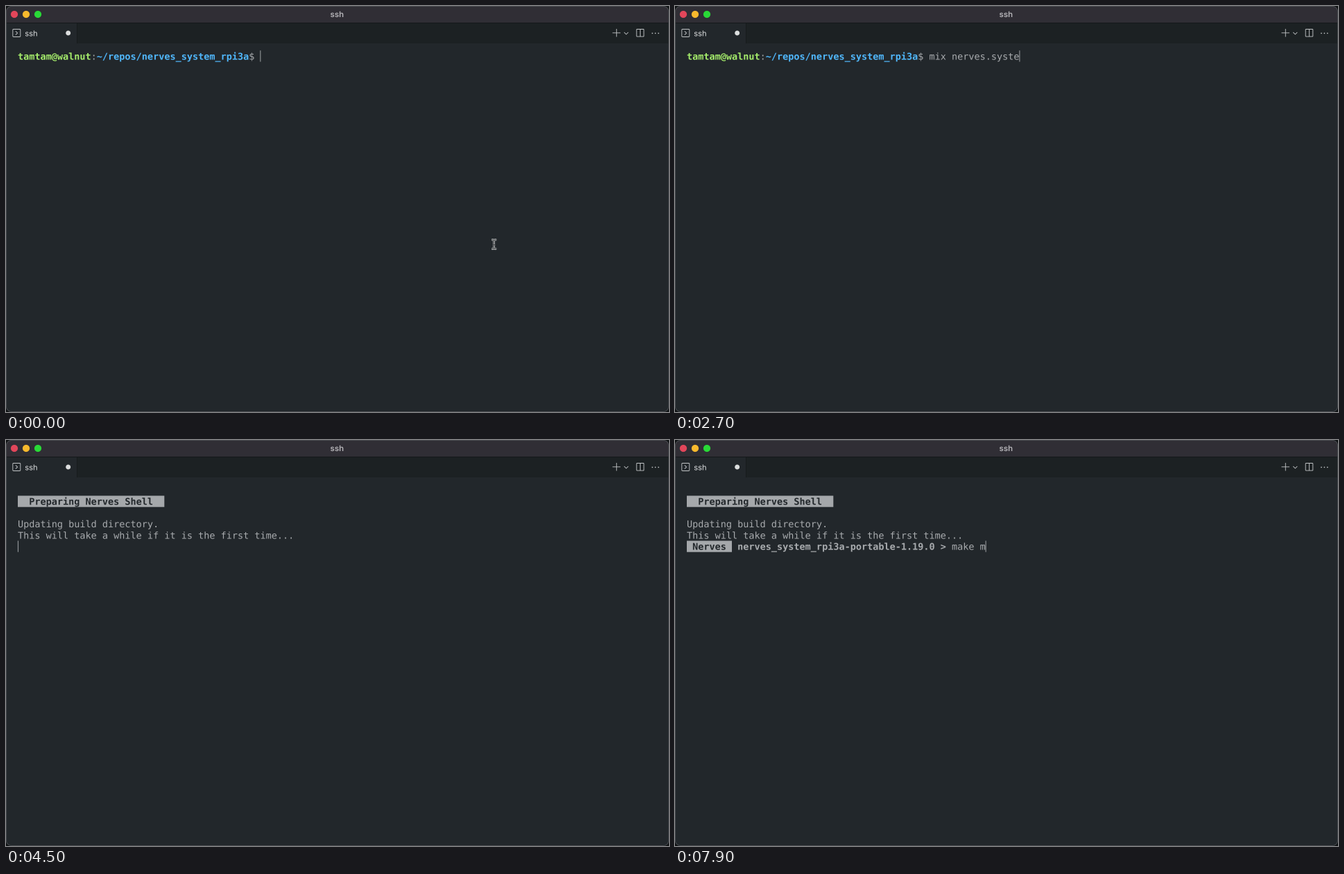
Recreate the animation shown at these times as an HTML page with a canvas. Size 956x586 px, loop 8000 ms.

```html
<!DOCTYPE html>
<html lang="en">
<head>
<meta charset="utf-8">
<title>Terminal</title>
<style>
  html, body { margin: 0; width: 100%; height: 100%; overflow: hidden; background: #101315; }
  canvas { display: block; width: 956px; height: 586px; }
</style>
</head>
<body>
<canvas id="view" width="1912" height="1172"></canvas>
<script>
const LOOP = 8000, STEP = 100;
const W = 956, H = 586;
const LEFT = 17, TOP = 64.2, CELL = 8.1277, ROW = 16.25, BASE = 13.2;
const BODY = '#22272b', STRIP = '#1c2123', ICON = '#c3c6c8';
const GRAY = '#a8abae', MARK = '#a5a8ab';
const MONO = '13.5px "DejaVu Sans Mono", monospace';

// Drawn at double density, shown at stage size
const ctx = document.getElementById('view').getContext('2d');
ctx.scale(2, 2);
ctx.textRendering = 'geometricPrecision';

// Bursts of keys: [start time, key count], one key per step
const command = { text: 'mix nerves.system.shell',
  bursts: [[300, 2], [600, 5], [1300, 4], [1800, 3], [2200, 1], [2700, 2], [3000, 2], [3300, 4]] };
const make = { text: 'make m',
  bursts: [[6900, 2], [7200, 1], [7500, 1], [7700, 1], [7900, 1]] };

function typed({ text, bursts }, t) {
  let n = 0;
  for (const [start, count] of bursts) {
    if (t >= start) n += Math.min(count, Math.floor((t - start) / STEP) + 1);
  }
  return text.slice(0, n);
}

// A run of text in one style
const plain = text => ({ text, color: GRAY });
const bold = (text, color = GRAY) => ({ text, color, bold: true });
const inverse = text => ({ text, color: BODY, bold: true, mark: true });

const PROMPT = [bold('tamtam@walnut', '#a5ec6b'), plain(':'),
  bold('~/repos/nerves_system_rpi3a', '#50b7fb'), plain('$ ')];
const HEADER = [inverse('  Preparing Nerves Shell  ')];
const NOTES = [[], [plain('Updating build directory.')],
  [plain('This will take a while if it is the first time...')]];
const SHELL = [inverse(' Nerves '), bold(' nerves_system_rpi3a-portable-1.19.0 >'), plain(' ')];

// Rows of runs; the cursor stands at the end of the last row
function screen(t) {
  if (t < 4400) {
    const row = [...PROMPT, plain(typed(command, t))];
    return t < 3800 ? [row] : [row, []];
  }
  if (t < 4500) return [[], HEADER, []];
  const rows = [[], HEADER, ...NOTES];
  return [...rows, t < 4700 ? [] : [...SHELL, plain(typed(make, t))]];
}

function rect(color, x, y, w, h) {
  ctx.fillStyle = color;
  ctx.fillRect(x, y, w, h);
}

function dot(color, x, y, r) {
  ctx.fillStyle = color;
  ctx.beginPath();
  ctx.arc(x, y, r, 0, Math.PI * 2);
  ctx.fill();
}

function stroke(color, width, ...paths) {
  ctx.strokeStyle = color;
  ctx.lineWidth = width;
  ctx.beginPath();
  for (const [first, ...rest] of paths) {
    ctx.moveTo(...first);
    rest.forEach(p => ctx.lineTo(...p));
  }
  ctx.stroke();
}

function box(color, x, y, w, h, r) {
  ctx.strokeStyle = color;
  ctx.lineWidth = 0.9;
  ctx.beginPath();
  ctx.roundRect(x, y, w, h, r);
  ctx.stroke();
}

function label(text, x, y, font, color, align) {
  ctx.font = font + ' Inter, sans-serif';
  ctx.fillStyle = color;
  ctx.textAlign = align;
  ctx.fillText(text, x, y);
}

function drawWindow() {
  rect('#101315', 0, 0, W, H);
  ctx.save();
  ctx.beginPath();
  ctx.roundRect(0, 0, W, H, 8);
  ctx.clip();
  rect(BODY, 0, 0, W, H);
  rect('#302e35', 0, 0, W, 24);
  rect('#14181a', 0, 24, W, 1);
  rect(STRIP, 102, 25, W - 102, 29);
  rect('#171b1d', 102, 25, 1, 29);
  ctx.restore();
  box('#4a4d51', 0.5, 0.5, W - 1, H - 1, 7.5);

  ['#e2465a', '#f8b92d', '#29d937'].forEach((c, i) => dot(c, 12 + 17 * i, 12, 5.15));
  label('ssh', 477.3, 15.9, '600 11.4px', '#b5b4b8', 'center');

  box(ICON, 9.8, 33.5, 11, 11, 1.2);
  stroke(ICON, 0.9, [[13.8, 36.3], [16.6, 39], [13.8, 41.7]]);
  label('ssh', 27.3, 43.5, '400 11.1px', '#dfe1e2', 'left');
  dot('#dcdede', 89.7, 39, 3.5);

  stroke(ICON, 0.9, [[874.5, 38.8], [886, 38.8]], [[880.3, 33], [880.3, 44.5]]);
  stroke(ICON, 0.9, [[891.3, 37.9], [894.3, 40.9], [897.3, 37.9]]);
  box(ICON, 909.2, 33.5, 10.6, 10.6, 0.8);
  stroke(ICON, 0.9, [[914.5, 33.5], [914.5, 44.1]]);
  [932, 936.4, 940.8].forEach(x => dot(ICON, x, 39.4, 0.85));
}

function drawPointer() {
  const x = 703.7, y = 344;
  const cap = s => [[x - 3.6, y + 6.8 * s], [x - 1.3, y + 6.6 * s], [x, y + 5.6 * s],
    [x + 1.3, y + 6.6 * s], [x + 3.6, y + 6.8 * s]];
  const shape = [[[x, y - 5.6], [x, y + 5.6]], cap(-1), cap(1),
    [[x - 1.4, y + 0.8], [x + 1.4, y + 0.8]]];
  stroke('#d8dadb', 2.5, ...shape);
  stroke('#17191b', 0.9, ...shape);
}

// Each glyph sits in its own cell
function drawRow(runs, row) {
  const y = TOP + row * ROW;
  let col = 0;
  for (const { text, color, bold, mark } of runs) {
    if (mark) rect(MARK, LEFT + col * CELL, y, text.length * CELL, ROW);
    ctx.font = (bold ? 'bold ' : '') + MONO;
    ctx.fillStyle = color;
    ctx.textAlign = 'left';
    for (const ch of text) ctx.fillText(ch, LEFT + col++ * CELL, y + BASE);
  }
  return col;
}

function frame(t) {
  drawWindow();
  const rows = screen(t);
  const col = rows.map(drawRow).pop();
  rect(GRAY, LEFT + col * CELL - 0.1, TOP + (rows.length - 1) * ROW, 0.95, ROW);
  if (t < 300) drawPointer();
}

const start = performance.now();
function tick() {
  frame((performance.now() - start) % LOOP);
  requestAnimationFrame(tick);
}
tick();
</script>
</body>
</html>
```
